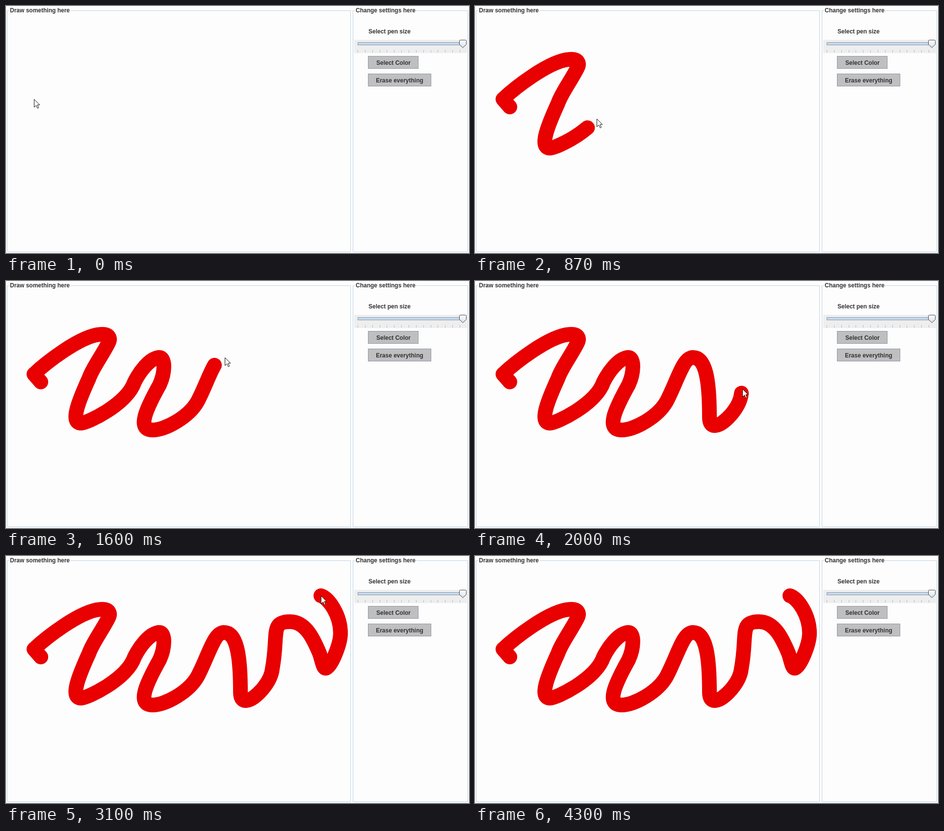
Write an HTML page that moves like this. It is 944 by 504 pixels and loops after 5160 ms.

```html
<!DOCTYPE html>
<html lang="en">
<head>
<meta charset="utf-8">
<title>Drawing panel</title>
<style>
  html, body { margin: 0; width: 100%; height: 100%; overflow: hidden; background: #fdfdfd; }
  svg { display: block; width: 944px; height: 504px; }
  text { font: bold 12px "Liberation Sans", Arial, sans-serif; fill: #333; }
  .mid { text-anchor: middle; }
  .frame { fill: none; stroke: #c0d3e6; }
  .button { fill: #bfbfc1; stroke: #8e95a3; }
  #line { fill: none; stroke: #e90000; stroke-width: 30; stroke-linecap: round; stroke-linejoin: round; }
</style>
</head>
<body>
<svg viewBox="0 0 944 504">
  <defs>
    <linearGradient id="knob" x2="0" y2="1">
      <stop offset="0" stop-color="#fff"/>
      <stop offset="1" stop-color="#d3e0ee"/>
    </linearGradient>
  </defs>

  <path class="frame" d="M6 9.5H2.5V501.5H702.5V9.5H132"/>
  <path class="frame" d="M711 9.5H707.5V501.5H941.5V9.5H836"/>
  <text x="8" y="13">Draw something here</text>
  <text x="713" y="13">Change settings here</text>

  <text x="739" y="56">Select pen size</text>
  <rect x="710" y="69" width="230" height="27" fill="#eee"/>
  <rect x="717.5" y="74.5" width="214" height="5" fill="#c8dcf0" stroke="#8795a5"/>
  <path id="ticks" stroke="#b0bac6"/>
  <path d="M924.5 71.5Q924.5 69.5 926.5 69.5H936.5Q938.5 69.5 938.5 71.5V78.5L931.5 85L924.5 78.5Z" fill="url(#knob)" stroke="#444"/>

  <rect class="button" x="738.5" y="102.5" width="102" height="25"/>
  <text class="mid" x="790" y="120">Select Color</text>
  <rect class="button" x="738.5" y="138.5" width="128" height="25"/>
  <text class="mid" x="802.5" y="156">Erase everything</text>

  <path id="line"/>
  <path id="cursor" d="M.5 .5V16.5L4.5 12.8L7.2 18.8L9.6 17.8L7 11.8H11.8Z" fill="#fff" stroke="#111"/>
</svg>
<script>
  const LOOP = 5160, STEP = 100 / 3, LEAVE = 97, TURN = 113, GONE = 129;

  // Each leg of the scribble: the step at which it is finished, and its curve
  const legs = [
    { end: 0, d: "M71 206" },
    { end: 1, d: "L57 190" },
    { end: 17, d: "C78 170 150 112 192 109 C212 107 213 118 209 126 C196 152 176 178 169 199" },
    { end: 35, d: "C148 245 130 290 153 290 C166 290 246 252 262 206 C272 186 292 158 312 156 C326 156 324 188 313 212" },
    { end: 60, d: "C285 262 266 304 299 304 C324 304 374 278 392 243 C414 200 424 157 444 156 C470 156 478 200 478 278 C478 290 482 295 489 295 C508 294 540 258 543 230" },
    { end: 73, d: "C556 160 538 134 579 134 C612 134 628 172 639 198" },
    { end: 93, d: "C644 212 646 229 652 229 C662 229 682 180 682 158 C682 120 658 86 642 81" }
  ];

  const $ = id => document.getElementById(id);
  const line = $("line"), cursor = $("cursor");
  const mix = (a, b, u) => a + (b - a) * u;
  const smooth = u => u * u * (3 - 2 * u);

  let d = "";
  for (const leg of legs) {
    d += leg.d;
    line.setAttribute("d", d);
    leg.length = line.getTotalLength();
  }

  // Length drawn so far; the hand slows a little between legs
  function drawn(step) {
    const i = legs.findIndex(leg => step <= leg.end);
    if (i < 0) return legs.at(-1).length;
    if (i === 0) return 0;
    const a = legs[i - 1], b = legs[i], u = (step - a.end) / (b.end - a.end);
    return mix(a.length, b.length, (u + smooth(u)) / 2);
  }

  // The pointer runs one step ahead of the paint, then leaves to the right
  function pointer(step) {
    if (step < LEAVE) {
      const p = line.getPointAtLength(drawn(step + 1));
      return [p.x, p.y];
    }
    const drift = smooth(Math.min(1, (step - LEAVE) / (TURN - LEAVE)));
    const away = smooth(Math.max(0, (step - TURN) / (GONE - 1 - TURN)));
    return [642 + 48 * drift + 228 * away, 81 + 7 * drift - 31 * away];
  }

  $("ticks").setAttribute("d",
    Array.from({ length: 15 }, (_, i) => `M${Math.round(717 + i * 14.86) + 0.5} 90V95`).join(""));

  function draw(now) {
    const step = Math.floor((now % LOOP + 4) / STEP);
    line.style.display = step > 0 ? "" : "none";
    line.setAttribute("stroke-dasharray", `${drawn(step)} 9999`);
    cursor.style.display = step < GONE ? "" : "none";
    cursor.setAttribute("transform", `translate(${pointer(step).map(Math.round)})`);
    requestAnimationFrame(draw);
  }
  draw(performance.now());
</script>
</body>
</html>
```
